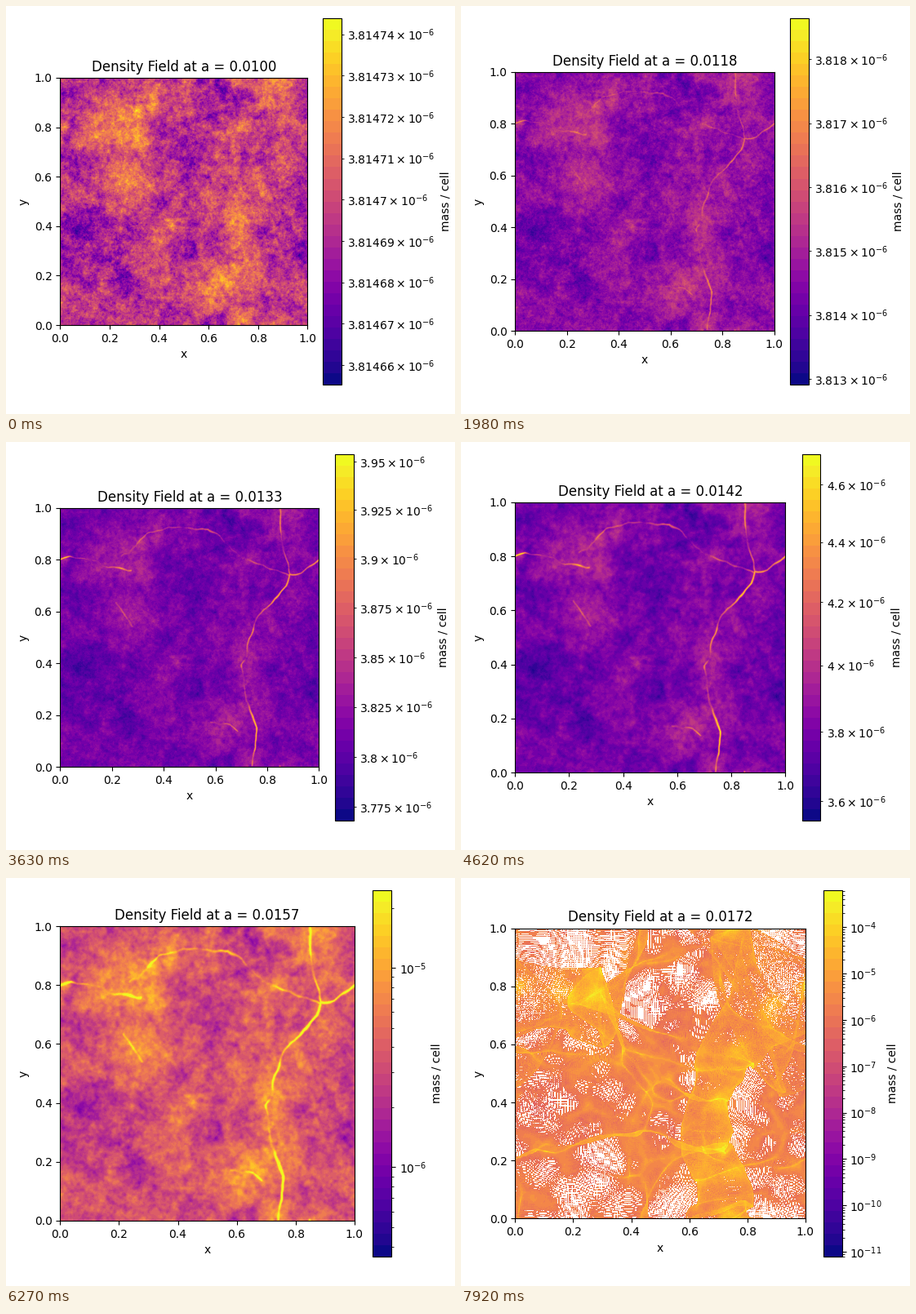
Animation, 550 px wide and 500 px high, one loop 8250 ms. Source, as a matplotlib script:

```python
import numpy as np
import matplotlib.pyplot as plt
from matplotlib.animation import FuncAnimation
from matplotlib.colors import LogNorm

N = 512
FRAMES, STEP = 25, 330
MEAN = 1 / N**2
COLLAPSE = 20  # from here on the field is built from moving particles

rng = np.random.default_rng(7)
cell = (np.arange(N) + 0.5) / N
X, Y = np.meshgrid(cell, cell)
freq = 2 * np.pi * np.fft.fftfreq(N, 1 / N)
KX, KY = np.meshgrid(freq, freq)
K2 = KX**2 + KY**2
K2[0, 0] = 1


def smooth(field, px):
    kernel = np.exp(-K2 * (px / N) ** 2 / 2)
    return np.fft.ifft2(np.fft.fft2(field) * kernel).real


def unit(field):
    return (field - field.mean()) / field.std()


def noise(slope, px=0):
    white = np.fft.fft2(rng.standard_normal((N, N))) * K2 ** (-slope / 2)
    white[0, 0] = 0
    return unit(smooth(np.fft.ifft2(white).real, px))


def wrap(d):
    return (d + .5) % 1 - .5


def to_line(points, x, y):
    """Vector from every cell to the nearest point of a polyline, on a periodic box."""
    best = np.full((N, N), np.inf)
    vx, vy = np.zeros((N, N)), np.zeros((N, N))
    for (x0, y0), (x1, y1) in zip(points, points[1:]):
        ux, uy = x1 - x0, y1 - y0
        rx, ry = wrap(x - (x0 + x1) / 2), wrap(y - (y0 + y1) / 2)
        t = np.clip((rx * ux + ry * uy) / (ux * ux + uy * uy), -.5, .5)
        dx, dy = t * ux - rx, t * uy - ry
        d2 = dx * dx + dy * dy
        near = d2 < best
        best = np.where(near, d2, best)
        vx, vy = np.where(near, dx, vx), np.where(near, dy, vy)
    return vx, vy, best


# Filaments: strength and key points
lines = [
    (1.0, [(0, .79), (.04, .803), (.15, .79), (.19, .768), (.27, .765)]),
    (1.0, [(.74, 0), (.745, .15), (.715, .25), (.705, .4), (.765, .58), (.87, .7),
           (.885, .745)]),
    (.8, [(.885, .745), (.93, .745), (1, .79)]),
    (.7, [(.84, 1), (.855, .86), (.885, .745)]),
    (.6, [(.24, .81), (.34, .9), (.42, .928), (.57, .912), (.68, .82), (.885, .74)]),
    (.5, [(.22, .64), (.25, .59), (.28, .54)]),
    (.5, [(.58, .17), (.65, .155), (.68, .13)]),
]
wx, wy = X + .004 * noise(1, 5), Y + .004 * noise(1, 5)
patchy = np.clip(.7 + .35 * noise(.5, 7), .1, 1.2)

threads = []
PX, PY, region, clump = np.zeros((4, N, N))
for strength, points in lines:
    vx, vy, d2 = to_line(points, wx, wy)
    threads.append((strength, d2 * N * N))
    pull = strength * np.exp(-d2 / (2 * (.1 * strength) ** 2))
    PX += pull * vx
    PY += pull * vy
    region = np.maximum(region, np.exp(-d2 / (2 * .06**2)))
    for x, y in points:
        r2 = wrap(X - x) ** 2 + wrap(Y - y) ** 2
        clump += strength**4 * np.exp(-r2 / (2 * .02**2))
PX, PY = smooth(PX, 4), smooth(PY, 4)

grain = unit(noise(1.1) + .45 * unit(region))
soft = unit(smooth(grain, 1.3))
void = unit(smooth(grain, 6))
dust = rng.random((N, N))

web = np.fft.fft2(noise(.6, 7))
SX, SY = (np.fft.ifft2(1j * K / K2 * web).real for K in (KX, KY))

# Log distance of the colour limits from the mean, growing between key steps
KEYS = [0, 6, 11, 14, 17, 21, 24]
ABOVE = [1.22e-5, 1.033e-3, .0358, .2105, .792, 4.352, 5.086]
BELOW = [1.10e-5, 4.68e-4, .0122, .0726, .410, 13.70, 13.08]


def limits(k):
    below, above = (np.exp(np.interp(k, KEYS, np.log(v))) for v in (BELOW, ABOVE))
    return MEAN * np.exp(-below), MEAN * np.exp(above)


def early(k, lo, hi):
    base = np.log(MEAN / lo) / np.log(hi / lo)
    spread = .055 + .065 * (k / 11 - 1) ** 2
    height = .6 * (1 - np.exp(-(k / 7) ** 2))
    width = .85 + .6 * (k / 19) ** 4
    line = np.max([s * np.exp(-d2 / (2 * width**2)) for s, d2 in threads], axis=0)
    mix = np.clip((k - 9) / 6, 0, 1)
    field = unit((1 - mix) * grain + mix * soft)
    return np.clip(base + spread * field + height * line * patchy, 0, 1)


def deposit(x, y):
    """Share each particle's mass among its four nearest cells."""
    gx, gy = x.ravel() * N - .5, y.ravel() * N - .5
    ix, iy = np.floor(gx).astype(int), np.floor(gy).astype(int)
    fx, fy = gx - ix, gy - iy
    mass = np.zeros(N * N)
    for ox, part_x in ((0, 1 - fx), (1, fx)):
        for oy, part_y in ((0, 1 - fy), (1, fy)):
            idx = (iy + oy) % N * N + (ix + ox) % N
            mass += np.bincount(idx, part_x * part_y, N * N)
    return mass.reshape(N, N) * MEAN


def late(k, lo, hi):
    t = k - COLLAPSE
    fall, stir = .7 * 1.36**t, .15 * 1.6**t
    mass = deposit(X + fall * PX + stir * SX, Y + fall * PY + stir * SY)
    empty = mass < .05 * t * MEAN
    if t:
        empty |= (void < -1.75) & (dust < .15)
    mass *= np.exp(.35 * soft) * (1 + t * clump)
    u = np.log(np.clip(mass, lo, hi) / lo) / np.log(hi / lo)
    return np.where(empty, np.nan, u)


fig = plt.figure(figsize=(5.5, 5), dpi=100)
cmap = plt.get_cmap("plasma", 32)


def update(k):
    fig.clear()
    fig.subplots_adjust(left=.125, right=.9, bottom=.11, top=.88)
    ax = fig.add_subplot()
    lo, hi = limits(k)
    field, sampling = ((late(k, lo, hi), "nearest") if k >= COLLAPSE
                       else (early(k, lo, hi), "antialiased"))
    ax.imshow(field, cmap=cmap, vmin=0, vmax=1, origin="lower",
              extent=(0, 1, 0, 1), interpolation=sampling)
    ax.set(xlabel="x", ylabel="y", title=f"Density Field at a = {.01 + .0003 * k:.4f}")
    scale = plt.cm.ScalarMappable(LogNorm(lo, hi), cmap)
    fig.colorbar(scale, ax=ax, label="mass / cell")
    fig.tight_layout()
    return []


anim = FuncAnimation(fig, update, frames=FRAMES, interval=STEP,
                     init_func=lambda: [], repeat=True, repeat_delay=0)
plt.show()
```
